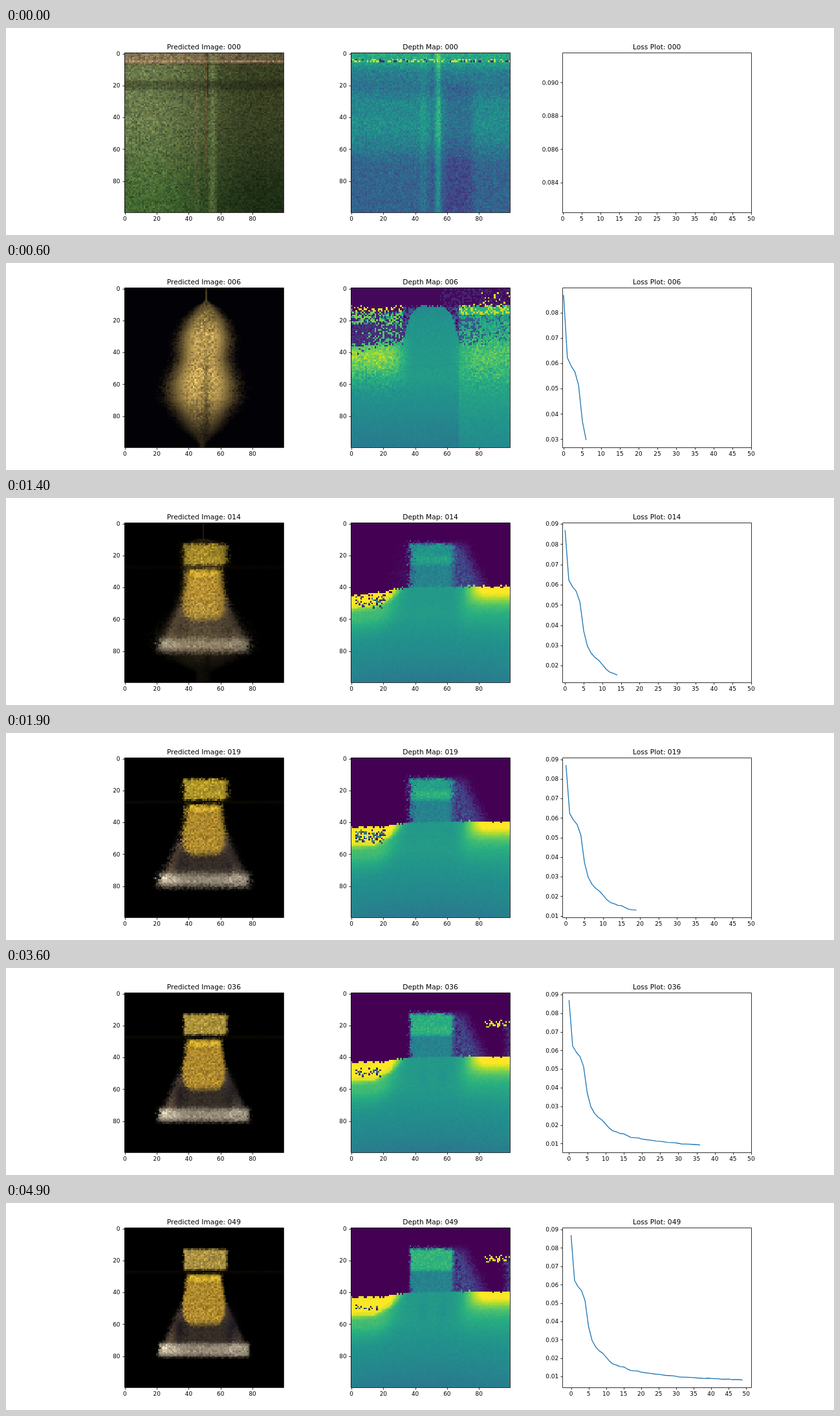
Recreate the animation shown at these times as an HTML page with a canvas. Size 1280 px wide and 320 px high, loop 5000 ms.

```html
<!DOCTYPE html>
<html lang="en">
<head>
<meta charset="utf-8">
<title>Training progress</title>
<style>
  html, body { margin: 0; width: 100%; height: 100%; overflow: hidden; background: #fff; }
  canvas { display: block; }
</style>
</head>
<body>
<canvas id="stage" width="1280" height="320"></canvas>
<script>
const ctx = document.getElementById('stage').getContext('2d');
const EPOCHS = 50, EPOCH_MS = 100, GRID = 100;
const TOP = 38.4, SIZE = 246.4, BOTTOM = TOP + SIZE;
const PHOTO_X = 182.68, DEPTH_X = 532.8, PLOT_X = 860.24, PLOT_W = 291.76;
const LOSSES = [
  .087, .0623, .059, .0567, .0513, .0372, .0297, .0262, .0241, .0227,
  .0206, .0183, .0168, .0162, .0154, .0152, .0142, .0133, .0131, .013,
  .0124, .0121, .0119, .0116, .0113, .0112, .0109, .0106, .0105, .0104,
  .0101, .0097, .0097, .0096, .0095, .0094, .0092, .0091, .0089, .0091,
  .009, .0088, .0088, .0085, .0085, .0086, .0083, .0083, .0083, .0081];
const VIRIDIS = [[68, 1, 84], [71, 45, 123], [59, 82, 139], [44, 114, 142], [33, 145, 140],
  [40, 174, 128], [94, 201, 98], [173, 220, 48], [253, 231, 37]];

// --- math helpers ---
const clamp = (v, lo = 0, hi = 1) => Math.min(hi, Math.max(lo, v));
const mix = (a, b, t) => a + (b - a) * t;
const paint = (a, b, t) => a.map((v, i) => mix(v, b[i], t));
const smooth = (a, b, v) => { const t = clamp((v - a) / (b - a)); return t * t * (3 - 2 * t); };
const inside = (v, a, b, soft) => smooth(a - soft, a + soft, v) * (1 - smooth(b - soft, b + soft, v));
const bump = (v, centre, width) => Math.exp(-(((v - centre) / width) ** 2));
function curve(points, v) {
  const i = points.findIndex(p => p[0] >= v);
  if (i < 0) return points[points.length - 1][1];
  if (i === 0) return points[0][1];
  const [x0, y0] = points[i - 1], [x1, y1] = points[i];
  return mix(y0, y1, (v - x0) / (x1 - x0));
}
function viridis(v) {
  const t = clamp(v) * 8, i = Math.min(7, Math.floor(t));
  return paint(VIRIDIS[i], VIRIDIS[i + 1], t - i);
}

// Fixed grain per pixel: g is bell shaped around 0, h is uniform.
let seed = 20;
function random() {
  seed = (seed + 0x6D2B79F5) | 0;
  let t = Math.imul(seed ^ (seed >>> 15), 1 | seed);
  t = (t + Math.imul(t ^ (t >>> 7), 61 | t)) ^ t;
  return ((t ^ (t >>> 14)) >>> 0) / 4294967296;
}
const grain = Array.from({ length: GRID * GRID }, () =>
  ({ g: (random() + random() + random() - 1.5) * 2, h: random() }));

// --- predicted image: colours at cell (x, y) ---
function meadow(x, y, g, h) {
  let c = paint([106, 122, 74], [56, 64, 34], smooth(10, 85, x));
  c = paint(c, paint([66, 104, 48], [28, 44, 20], smooth(10, 85, x)), smooth(35, 100, y));
  c = paint(c, [150, 118, 88], .7 * (1 - smooth(4, 9, y)) * mix(1, .6, x / 99));
  if (y === 5) c = paint(c, [195, 135, 115], .6);
  c = paint(c, [110, 128, 76], .55 * inside(x, 53, 57, 1.5));
  c = paint(c, [120, 80, 48], .55 * inside(x, 50, 51, 1) * (1 - smooth(55, 95, y)));
  c = paint(c, [130, 110, 80], .25 * inside(x, 44, 46, 1));
  const shade = (1 - .25 * inside(y, 17, 23, 2)) * (x === 52 && y < 28 ? .65 : 1) * (y === 7 ? .85 : 1);
  return c.map((v, i) => v * shade * (1 + .13 * g + .14 * (h - .5) * (i - 1)));
}

function blob(x, y, g) {
  const half = curve([[7, 0], [12, 9], [20, 17], [32, 22], [44, 21], [60, 28], [70, 28], [80, 21], [88, 15], [97, 3]], y);
  const off = Math.abs(x - mix(51, 48.5, smooth(10, 60, y))) / Math.max(half, .1);
  const light = curve([[8, .35], [16, .6], [28, .9], [44, .85], [58, .95], [68, .85], [78, .55], [92, .2]], y);
  const cleft = 1 - .3 * bump(x, 51, 2) * smooth(30, 65, y);
  const a = (1 - smooth(.25, 1.05, off + .06 * g)) * light * cleft * (1 + .15 * g);
  return paint([2, 1, 5], [208, 174, 92], Math.max(0, a));
}

function bell(x, y, g) {
  const half = curve([[9, 0], [12, 13], [22, 14], [28, 13], [40, 14], [52, 17], [60, 23], [68, 30], [78, 30], [84, 24], [93, 5]], y);
  const off = Math.abs(x - 49) / Math.max(half, .1);
  const light = curve([[11, .5], [20, .72], [31, 1], [50, .95], [62, .85], [72, .85], [80, .7], [91, .25]], y);
  const cleft = 1 - .35 * bump(x, 52, 2) * smooth(68, 84, y);
  const core = mix(.65, 1, bump(x, 48, 14));
  const a = (1 - smooth(.6, 1.2, off + .09 * g)) * light * cleft * core * (1 + .13 * g);
  return paint([0, 0, 0], paint([212, 168, 66], [196, 166, 100], smooth(38, 65, y)), Math.max(0, a));
}

function flask(x, y, g, h, sharp) {
  const soft = mix(2.6, 1.2, sharp), rough = mix(.9, .4, sharp);
  const u = x + g * rough, v = y + (h - .5) * rough * 2;
  const left = 36 - (v - 45) * .45, right = 63 + (v - 45) * .45;
  const glass = inside(u, left, right, soft + .5) * inside(v, 46, 80, soft);
  let c = paint([0, 0, 0], [52, 44, 38], glass);
  c = paint(c, [112, 88, 66], .65 * bump(u, left + 4, 3) * inside(v, 48, 76, 4));
  c = paint(c, [88, 76, 66], .55 * bump(u, right - 4, 3) * inside(v, 48, 76, 4));
  const hollow = (bump(u, 34, 3.5) + bump(u, 67, 3.5)) * bump(v, 62, 8);
  c = paint(c, [20, 17, 26], clamp(hollow) * mix(.4, .8, sharp));
  const base = inside(u, 21, 78, soft) * inside(v, 72, 80, soft + .8);
  c = paint(c, [150, 139, 120], base * .95);
  c = paint(c, [228, 216, 190], base * (.75 * bump(x, 27, 6) + .3 * bump(x, 70, 6)) * bump(y, 75, 4));
  const half = curve([[33, 11], [38, 12], [46, 13.5], [54, 13], [60, 10], [66, 3], [68, 0]], v);
  c = paint(c, [180, 142, 46], inside(u, 49.5 - half, 49.5 + half, soft) * inside(v, 30, 60, 3) * .95);
  c = paint(c, [216, 178, 46], inside(u, 39, 60, soft) * inside(v, 29, 33, 1.8));
  const cap = paint([178, 152, 42], [172, 146, 66], sharp);
  c = paint(c, cap, inside(u, 37, 64, soft) * inside(v, 13, 26, 1.2));
  c = paint(c, [20, 15, 8], .6 * bump(y, 27.3, .9) * (1 - .4 * bump(x, 50, 10)));
  return c.map(k => k * (1 + .11 * g));
}

// --- depth map: values from 0 to 1 at cell (x, y) ---
function flatDepth(x, y, g, h) {
  if ((y === 4 || y === 5) && h < .38) return h < .25 ? .92 : .12;
  const row = curve([[0, .6], [5, .6], [7, .53], [12, .42], [22, .38], [30, .46], [48, .48], [60, .4], [70, .32], [99, .31]], y);
  const valley = inside(x, 58, 76, 4) * smooth(10, 30, y) * .1;
  const stripes = .17 * inside(x, 53, 56, .8) - .08 * inside(x, 50, 51, .8) + .05 * inside(x, 43, 47, 1);
  return row - valley + stripes + .04 * g;
}

function veilDepth(x, y, g, h) {
  const off = Math.abs(x - 50);
  const side = smooth(10, 28, off);
  const ground = curve([[10, .46], [20, .51], [55, .54], [75, .48], [99, .41]], y)
    + (x < 50 ? .28 : .12) * side * bump(y, 42, 13) + g * (.01 + .04 * side * (1 - smooth(50, 75, y)));
  const hill = curve([[0, 10], [8, 11], [13, 16], [16, 26], [18, 34]], off);
  if (y < 11 + g * .5) {
    if (x > 76 && y > 2 && h < .02 * (y - 2) * smooth(70, 95, x) + .02) return .95;
    return x > 55 && h > .6 ? .1 : .02;
  }
  if (off < 18 && y > hill) return ground;
  if (off < 18) return .18 + .1 * g;
  if (x < 50) {
    if (y < 15) return h < .35 ? .95 : .03;
    if (y < 23) return h < .4 ? .78 : h < .6 ? .5 : .1;
    if (y < 37 - x / 8 + g * 2) return h < x / 70 ? .72 : .05 + h * .14;
    return ground;
  }
  if (y < 17) return h < .45 ? .9 : .64;
  return y < 36 && h < .45 * (1 - smooth(66, 92, x)) + .1 ? .26 : ground + .06;
}

function flaskDepth(x, y, g, h, formed, sharp) {
  const early = 1 - formed;
  const horizon = x < 50
    ? mix(curve([[0, 50], [15, 46], [28, 40], [40, 39]], x), curve([[0, 43], [22, 42.5], [38, 40]], x), formed)
    : 39.5;
  if (y > horizon + g * mix(1, .35, formed)) {
    const lag = ((x - 50) / 50) ** 2;
    let v = curve([[38, .53], [58, .54], [74, .49], [88, .45], [99, .4]], y - 5 * lag) + g * .008;
    if (x < 50) {
      const edge = mix(curve([[0, 50], [20, 45], [34, 38]], x), curve([[0, 55], [15, 54], [25, 48], [37, 39]], x), formed);
      const speckled = inside(x, 2, mix(21, 17, sharp), 1) * inside(y, mix(45, 48, sharp), mix(53, 51, sharp), 1);
      if (h < speckled * mix(.4, .27, sharp) * formed) return h < .15 ? .05 : .4;
      v += .42 * (1 - smooth(edge - 5, edge + 4, y)) * smooth(36, 24, 0) * (1 - smooth(24, 37, x));
      v += .15 * bump(y, edge + 3, 11) * (1 - smooth(18, 38, x));
      if (y < edge && x < 26) v = Math.max(v, .95);
    } else {
      v += .4 * bump(y, 40, 8) * smooth(68, 85, x) + .15 * bump(y, 46, 14) * smooth(62, 76, x);
    }
    return v - .035 * sharp * bump(y, 52, 7) * (bump(x, 45, 3) + bump(x, 57, 3));
  }
  if (sharp > .6 && inside(x, 84, 99, 1) * inside(y, 17, 21, 1) > h * 2.8) return .95;
  if (early > .5 && x > 93 && y > 20 && y < 33 && h < .12) return .95;
  const u = x + g * mix(1.2, .5, sharp);
  const soft = mix(3, 1.3, sharp);
  const column = inside(u, 37, 64 + 2 * early, soft) * smooth(11, 14, y + g * .5);
  const cap = mix(.4, mix(.56 + .08 * inside(y, 20, 25, 2), .65, sharp), formed);
  const body = mix(cap, .44, smooth(25, 28, y));
  const haze = .2 * inside(x + g * 2, 64, mix(72, 82, smooth(14, 40, y)), 5) * smooth(9, 18, y)
    + .12 * early * inside(x + g * 3, 30, 70, 6) * smooth(8, 40, y)
    + .14 * sharp * smooth(94, 100, x + g) * smooth(14, 22, y);
  if (early > .5 && y > 19 && y < 24 && column > .9 && h < .14) return .65;
  return Math.max(haze * (1 + .3 * g), column * (body + .025 * g));
}

// --- development over the epochs ---
const easeOut = t => 1 - (1 - clamp(t)) ** 2;

function photoAt(n) {
  const formed = easeOut((n - 10) / 9), sharp = clamp((n - 19) / 24);
  return (x, y, g, h) => {
    if (n < 6) {
      const glow = curve([[0, .2], [1, .28], [3, .45], [6, 1]], n);
      const dim = blob(x, y, g).map(v => v * glow);
      return paint(meadow(x, y, g, h), dim, curve([[0, 0], [1, .7], [3, 1]], n));
    }
    if (n < 10) return paint(blob(x, y, g), bell(x, y, g), (n - 6) / 4);
    const clear = flask(x, y, g, h, sharp);
    return formed < 1 ? paint(bell(x, y, g), clear, formed) : clear;
  };
}

function depthAt(n) {
  const formed = easeOut((n - 10) / 9), sharp = clamp((n - 19) / 24);
  return (x, y, g, h) => {
    if (n < 6) return viridis(mix(flatDepth(x, y, g, h), veilDepth(x, y, g, h), n / 6));
    const late = flaskDepth(x, y, g, h, formed, sharp);
    return viridis(n < 10 ? mix(veilDepth(x, y, g, h), late, (n - 6) / 4) : late);
  };
}

// --- drawing ---
const tile = document.createElement('canvas');
tile.width = tile.height = GRID;
const tileCtx = tile.getContext('2d');
const pixels = tileCtx.createImageData(GRID, GRID);
const snap = v => Math.round(v) + .5;

function line(x0, y0, x1, y1) {
  ctx.beginPath();
  ctx.moveTo(x0, y0);
  ctx.lineTo(x1, y1);
  ctx.stroke();
}

function label(text, x, y, align, size = 8.89) {
  ctx.font = `${size}px "DejaVu Sans", sans-serif`;
  ctx.textAlign = align;
  ctx.fillText(text, x, y);
}

function frame(x, width, title) {
  ctx.strokeStyle = ctx.fillStyle = '#000';
  ctx.lineWidth = .8;
  ctx.strokeRect(snap(x), snap(TOP), snap(x + width) - snap(x), snap(BOTTOM) - snap(TOP));
  label(title, x + width / 2, 33, 'center', 10.67);
}

function tickX(x, text) {
  line(snap(x), snap(BOTTOM), snap(x), snap(BOTTOM) + 3.1);
  label(text, x, 298, 'center');
}

function tickY(axis, y, text) {
  line(snap(axis), snap(y), snap(axis) - 3.1, snap(y));
  label(text, axis - 6.2, Math.round(y + 3.25), 'right');
}

function drawImagePanel(x0, title, colourAt) {
  grain.forEach(({ g, h }, i) => {
    const [r, gr, b] = colourAt(i % GRID, Math.floor(i / GRID), g, h);
    pixels.data.set([r, gr, b, 255], i * 4);
  });
  tileCtx.putImageData(pixels, 0, 0);
  ctx.imageSmoothingEnabled = false;
  ctx.drawImage(tile, Math.round(x0), Math.round(TOP), 246, 247);
  frame(x0, SIZE, title);
  for (let v = 0; v < GRID; v += 20) {
    const offset = (v + .5) * SIZE / GRID;
    tickX(x0 + offset, v);
    tickY(x0, TOP + offset, v);
  }
}

function drawLossPanel(n, title) {
  const data = LOSSES.slice(0, n + 1);
  let low = Math.min(...data), high = Math.max(...data);
  if (n === 0) { low *= .95; high *= 1.05; }
  const pad = (high - low) * .05;
  low -= pad;
  high += pad;
  const xMin = n ? -.05 * n : -.055, xMax = Math.max(EPOCHS, 1.05 * n);
  const toX = v => PLOT_X + (v - xMin) / (xMax - xMin) * PLOT_W;
  const toY = v => BOTTOM - (v - low) / (high - low) * SIZE;

  ctx.strokeStyle = '#1f77b4';
  ctx.lineWidth = 1.33;
  ctx.lineJoin = 'round';
  ctx.beginPath();
  data.forEach((v, i) => ctx.lineTo(toX(i), toY(v)));
  if (n) ctx.stroke();

  frame(PLOT_X, PLOT_W, title);
  for (let v = 0; v <= EPOCHS; v += 5) tickX(toX(v), v);
  const step = [.002, .005, .01].find(s => s >= (high - low) / 9);
  for (let k = Math.ceil(low / step); k * step <= high; k++) {
    tickY(PLOT_X, toY(k * step), (k * step).toFixed(step < .01 ? 3 : 2));
  }
}

function draw(n) {
  const number = String(n).padStart(3, '0');
  ctx.fillStyle = '#fff';
  ctx.fillRect(0, 0, 1280, 320);
  drawImagePanel(PHOTO_X, `Predicted Image: ${number}`, photoAt(n));
  drawImagePanel(DEPTH_X, `Depth Map: ${number}`, depthAt(n));
  drawLossPanel(n, `Loss Plot: ${number}`);
}

const start = performance.now();
let shown = -1;
function tick() {
  const n = Math.floor(Math.max(0, performance.now() - start) / EPOCH_MS) % EPOCHS;
  if (n !== shown) draw(shown = n);
  requestAnimationFrame(tick);
}
tick();
</script>
</body>
</html>
```
